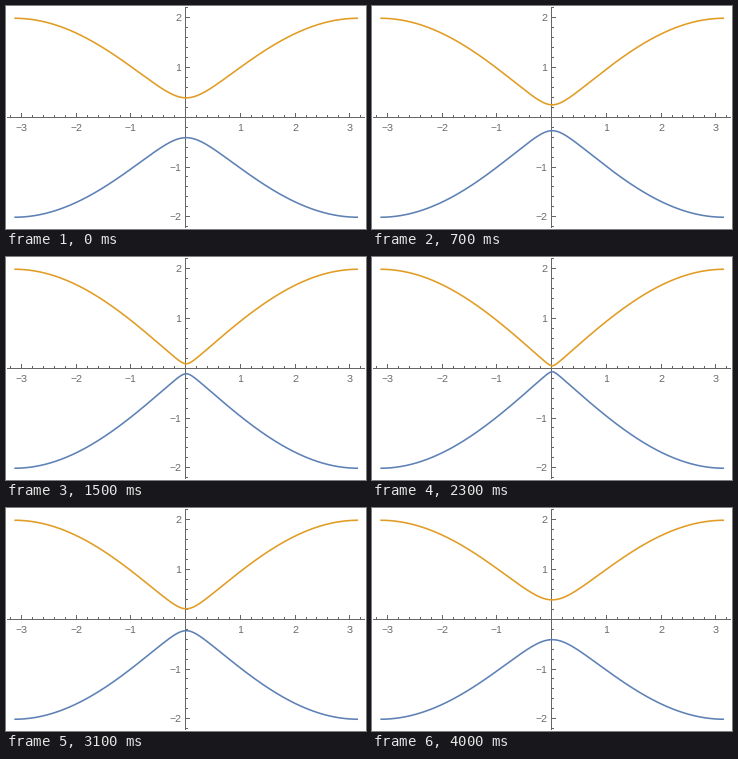
A matplotlib script for the animation above (4.1 s loop, 360 by 223 pixels).

```python
import numpy as np
import matplotlib.pyplot as plt
from matplotlib.animation import FuncAnimation

W, H, DPI = 360, 223, 100
PX = 72 / DPI                      # points per pixel
FRAMES, INTERVAL = 41, 100
CX, CY = 180.2, 111.75             # plot origin in pixels
SX, SY = 54.7, 49.75               # pixels per unit
MAJOR, MINOR = 4.5, 2.5            # tick lengths
GREY, BLUE, ORANGE = "#666666", "#5e81b5", "#e19c24"

plt.rcParams.update({"font.family": "Liberation Sans",
                     "text.hinting": "native",
                     "text.hinting_factor": 1})
fig = plt.figure(figsize=(W / DPI, H / DPI), dpi=DPI, facecolor="white")
ax = fig.add_axes([0, 0, 1, 1])
ax.set_xlim(0, W)
ax.set_ylim(H, 0)
ax.axis("off")


def to_px(x, y):
    return CX + SX * x, CY - SY * y


def crisp(v):
    """Centre of the pixel that a thin line at v fills."""
    return np.floor(v - 0.5) + 0.5


def segment(x0, y0, x1, y1):
    ax.plot([x0, x1], [y0, y1], color=GREY, lw=PX, snap=False,
            solid_capstyle="butt", zorder=1)


def label(x, y, value, align):
    ax.text(x, y, str(value).replace("-", "\u2212"), color=GREY,
            fontsize=10 * PX, ha=align, va="baseline")


def draw_axes():
    x0, y0 = crisp(CX), crisp(CY)
    segment(1, y0, W - 1, y0)
    segment(x0, 1, x0, H - 1)
    for i in range(-16, 17):
        if i == 0:
            continue
        major = i % 5 == 0
        size = MAJOR if major else MINOR
        x, y = (crisp(v) for v in to_px(i / 5, i / 5))
        segment(x, y0, x, y0 - size)
        if major:
            label(x, 125, i // 5, "center")
        if abs(i) <= 11:
            segment(x0, y, x0 + size, y)
            if major:
                label(x0 - 4, y + 3.5, i // 5, "right")


def energy(k, d):
    """Upper band of a two-site chain with hoppings 1 + d and 1 - d."""
    return 2 * np.sqrt(np.sin(k / 2) ** 2 + (d * np.cos(k / 2)) ** 2)


k = np.linspace(-np.pi, np.pi, 401)
draw_axes()
style = dict(lw=1.6 * PX, solid_capstyle="butt", zorder=2)
lower, = ax.plot([], [], color=BLUE, **style)
upper, = ax.plot([], [], color=ORANGE, **style)


def update(frame):
    e = energy(k, -0.2 + 0.01 * frame)
    upper.set_data(*to_px(k, e))
    lower.set_data(*to_px(k, -e))
    return lower, upper


anim = FuncAnimation(fig, update, frames=FRAMES, interval=INTERVAL,
                     repeat=True, repeat_delay=0)
plt.show()
```
